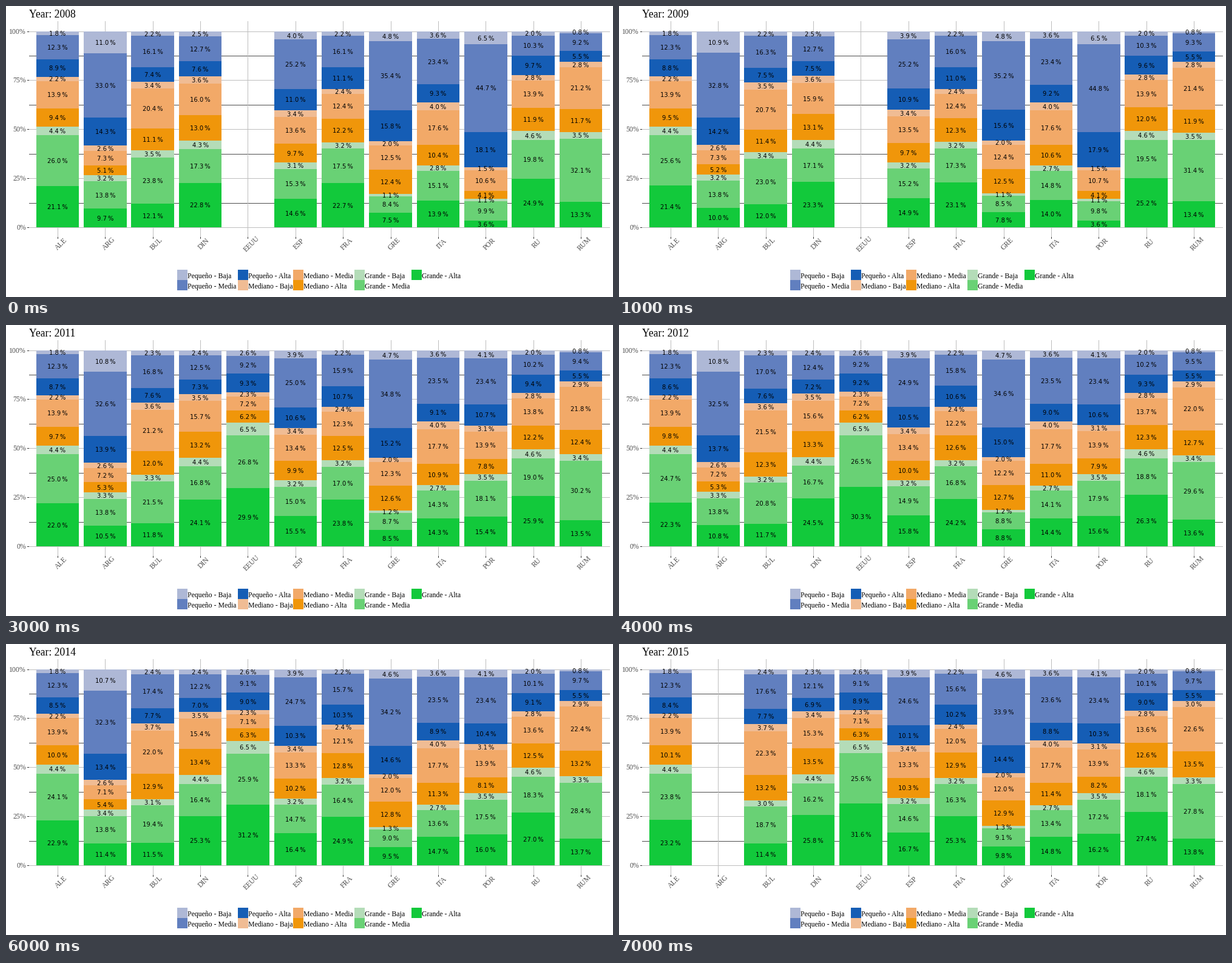
A matplotlib script that plays this animation: 1000 px wide and 480 px high, repeating every 8 s.

```python
import matplotlib.pyplot as plt
import numpy as np
from matplotlib.animation import FuncAnimation
from matplotlib.patches import Rectangle

WIDTH, HEIGHT, DPI = 1000, 480, 100
LEFT, RIGHT, TOP, BOTTOM = 38, 994, 25, 381
Y_ZERO, Y_FULL = 365.4, 42.2
STEP = (RIGHT - LEFT) / 12.2
BAR_WIDTH = 0.9 * STEP
FIRST_YEAR, KEY_YEAR, LAST_YEAR = 2008, 2012, 2015

# Name, colour and yearly growth common to all countries.
BANDS = [
    ("Pequeño - Baja", "#aeb8d6", 0), ("Pequeño - Media", "#617fbf", 0),
    ("Pequeño - Alta", "#155db5", -0.008), ("Mediano - Baja", "#f0bc94", 0),
    ("Mediano - Media", "#f2a968", 0), ("Mediano - Alta", "#f0960a", 0.012),
    ("Grande - Baja", "#b4dcb8", 0), ("Grande - Media", "#69d175", -0.012),
    ("Grande - Alta", "#12c93b", 0.014),
]
BAND_GROWTH = np.array([growth for *_, growth in BANDS])
IS_LARGE = np.array([name.startswith("Grande") for name, *_ in BANDS])

# Yearly growth of the large bands, then the key-year mix from the top down;
# the lowest band takes the remainder.
COUNTRIES = {
    "ALE": (0, [1.8, 12.3, 8.6, 2.2, 13.9, 9.8, 4.4, 24.7]),
    "ARG": (0.015, [10.8, 32.5, 13.7, 2.6, 7.2, 5.3, 3.3, 13.8]),
    "BUL": (-0.035, [2.3, 17.0, 7.6, 3.6, 21.5, 12.3, 3.2, 20.8]),
    "DIN": (0.01, [2.4, 12.4, 7.2, 3.5, 15.6, 13.3, 4.4, 16.7]),
    "EEUU": (0.005, [2.6, 9.2, 9.2, 2.3, 7.2, 6.2, 6.5, 26.5]),
    "ESP": (0.008, [3.9, 24.9, 10.5, 3.4, 13.4, 10.0, 3.2, 14.9]),
    "FRA": (0.006, [2.2, 15.8, 10.6, 2.4, 12.2, 12.6, 3.2, 16.8]),
    "GRE": (0.03, [4.7, 34.6, 15.0, 2.0, 12.2, 12.7, 1.2, 8.8]),
    "ITA": (-0.006, [3.6, 23.5, 9.0, 4.0, 17.7, 11.0, 2.7, 14.1]),
    "POR": (0, [4.1, 23.4, 10.6, 3.1, 13.9, 7.9, 3.5, 17.9]),
    "RU": (0.003, [2.0, 10.2, 9.3, 2.8, 13.7, 12.3, 4.6, 18.8]),
    "RUM": (-0.017, [0.8, 9.5, 5.5, 2.9, 22.0, 12.7, 3.4, 29.6]),
}
POR_BREAK = 2011
POR_EARLY = [6.5, 45.0, 17.6, 1.5, 10.7, 4.3, 1.1, 9.5]
AVAILABLE = {"ARG": (FIRST_YEAR, 2014), "EEUU": (2010, LAST_YEAR)}


def shares(country, year):
    """Percentages of the nine bands, or None where there is no data."""
    first, last = AVAILABLE.get(country, (FIRST_YEAR, LAST_YEAR))
    if not first <= year <= last:
        return None
    growth, mix = COUNTRIES[country]
    if country == "POR" and year < POR_BREAK:
        mix = POR_EARLY
    mix = np.append(mix, 100 - sum(mix))
    t = year - KEY_YEAR
    mix = mix * (1 + BAND_GROWTH * t) * np.exp(growth * t * IS_LARGE)
    return 100 * mix / mix.sum()


plt.rcParams["font.family"] = "Liberation Serif"
fig = plt.figure(figsize=(WIDTH / DPI, HEIGHT / DPI), dpi=DPI, facecolor="white")
ax = fig.add_axes([0, 0, 1, 1])
ax.set(xlim=(0, WIDTH), ylim=(HEIGHT, 0))
ax.axis("off")


def box(x, y, w, h, color, z=1):
    patch = Rectangle((x, y), w, h, fc=color, lw=0, aa=False, zorder=z)
    return ax.add_patch(patch)


def write(x, y, text, px, **style):
    style = {"va": "center", "zorder": 5, **style}
    return ax.text(x, y, text, fontsize=px * 72 / DPI, **style)


def level(percent):
    return Y_ZERO + (Y_FULL - Y_ZERO) * percent / 100


def center(i):
    return LEFT + (0.6 + i) * STEP


for percent in np.arange(12.5, 100, 25):
    box(LEFT, int(level(percent)), RIGHT - LEFT + 1, 1, "#4d4d4d")
for percent in range(0, 101, 25):
    y = int(level(percent))
    box(LEFT, y, RIGHT - LEFT + 1, 1, "#bebebe")
    box(LEFT - 3, y, 3, 1, "#333333")
    write(33, y + 1, f"{percent}%", 11.73, color="#4d4d4d", ha="right")

bars = {}
for i, country in enumerate(COUNTRIES):
    x = round(center(i))
    box(x, TOP, 1, BOTTOM - TOP, "#bebebe")
    box(x, BOTTOM, 1, 3, "#333333")
    write(center(i) + 6, 392.5, country, 11.73, color="#4d4d4d", ha="center",
          rotation=45, rotation_mode="anchor")
    x0 = round(center(i) - BAR_WIDTH / 2)
    x1 = round(center(i) + BAR_WIDTH / 2)
    bars[country] = [
        (box(x0, 0, x1 - x0, 1, color, 3),
         write(center(i), 0, "", 10, family="DejaVu Sans", ha="center"))
        for _, color, _ in BANDS
    ]

title = write(38, 19, "", 17.6, va="baseline")
for k, (name, color, _) in enumerate(BANDS):
    x, y = [282, 382, 473, 574, 668][k // 2], 435 + 17 * (k % 2)
    box(x, y, 17, 17, color)
    write(x + 17, y + 14, name, 11.73, va="baseline")


def draw(frame):
    year = FIRST_YEAR + frame
    title.set_text(f"Year: {year}")
    for country, parts in bars.items():
        values = shares(country, year)
        for artist in (a for pair in parts for a in pair):
            artist.set_visible(values is not None)
        if values is None:
            continue
        top = 100
        for (bar, label), value in zip(parts, values):
            low = top - value
            y0, y1 = round(level(top)), round(level(low))
            bar.set_y(y0)
            bar.set_height(y1 - y0)
            label.set_y(level((top + low) / 2) + 1)
            label.set_text(f"{value:.1f}\u2009%")
            top = low
    return []


anim = FuncAnimation(fig, draw, frames=LAST_YEAR - FIRST_YEAR + 1, interval=1000,
                     repeat=True, repeat_delay=0)
plt.show()
```
